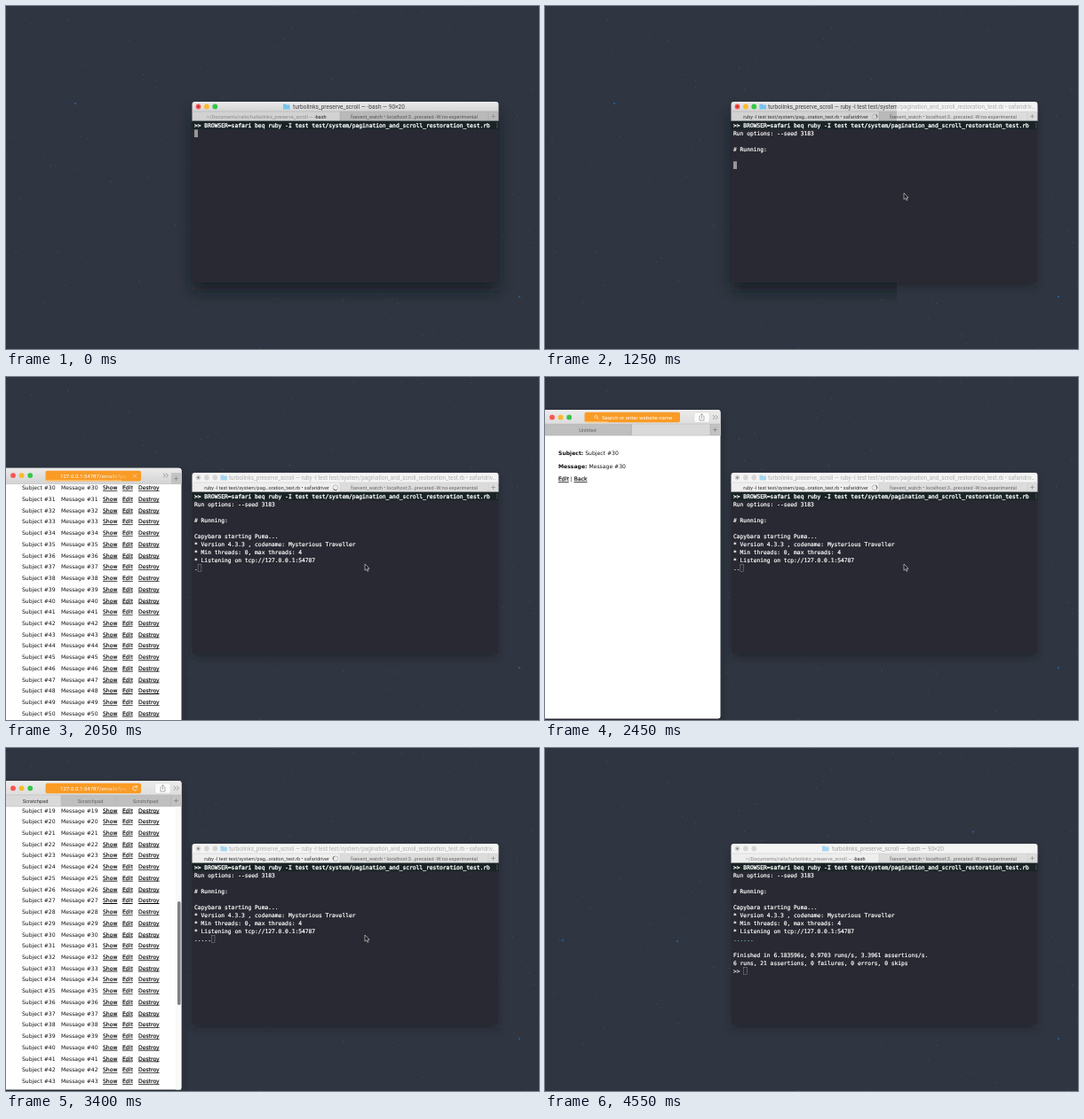
These frames come from a looping animation (600x387 px, 4.6 s). An HTML page:

```html
<!DOCTYPE html>
<html lang="en">
<head>
<meta charset="utf-8">
<title>Browser test run</title>
<style>
html, body { margin: 0; width: 100%; height: 100%; overflow: hidden; background: #303641; }
svg { display: block; width: 100vw; height: 100vh; }
text { white-space: pre; }
.ui { font-family: Roboto, Inter, sans-serif; }
.web { font-family: "DejaVu Sans", sans-serif; font-size: 6.1px; fill: #111; }
.mono { font-family: "DejaVu Sans Mono", monospace; font-size: 6.29px; fill: #fff; stroke: #fff; stroke-width: .2px; }
.command { stroke-width: .3px; }
.pass { fill: #66cbd0; stroke: #66cbd0; }
.link { text-decoration: underline; fill: #000; stroke: #000; stroke-width: .13px; }
.bold { font-weight: bold; }
</style>
</head>
<body>
<svg viewBox="0 0 600 387" preserveAspectRatio="none">
  <defs>
    <linearGradient id="bar" x1="0" y1="0" x2="0" y2="1">
      <stop offset="0" stop-color="#ebebeb"/><stop offset="1" stop-color="#d3d3d3"/>
    </linearGradient>
    <linearGradient id="fade" gradientUnits="userSpaceOnUse" x1="60" x2="135" y1="0" y2="0">
      <stop offset=".6" stop-color="#fff"/><stop offset="1" stop-color="#fff" stop-opacity=".25"/>
    </linearGradient>
    <filter id="blur" x="-20%" y="-20%" width="140%" height="150%"><feGaussianBlur stdDeviation="8"/></filter>
    <filter id="soft" x="-20%" y="-20%" width="140%" height="150%"><feGaussianBlur stdDeviation="5"/></filter>
    <clipPath id="left"><rect width="396" height="387"/></clipPath>
    <clipPath id="right"><rect x="396" width="204" height="387"/></clipPath>
    <clipPath id="page"><rect id="pageBox" width="197.5" height="387"/></clipPath>
  </defs>
  <g id="sky"></g>
  <g id="scene"></g>
</svg>
<script>
const LOOP = 4600, STEP = 50, ROW = 12.73, LINE = 8.97;
const $ = id => document.getElementById(id);

const rect = (x, y, w, h, fill, more = '') =>
  `<rect x="${x}" y="${y}" width="${w}" height="${h}" fill="${fill}" ${more}/>`;
const circle = (x, y, r, fill, more = '') =>
  `<circle cx="${x}" cy="${y}" r="${r}" fill="${fill}" ${more}/>`;
const path = (d, stroke, width = .6, fill = 'none') =>
  `<path d="${d}" stroke="${stroke}" stroke-width="${width}" fill="${fill}"/>`;
const text = (x, y, str, cls, more = '') =>
  `<text x="${x}" y="${y}" class="${cls}" ${more}>${str}</text>`;
const ui = (x, y, str, size, fill, anchor = 'start') =>
  text(x, y, str, 'ui', `font-size="${size}" fill="${fill}" text-anchor="${anchor}"`);
const lights = (x, y, gap, colors) =>
  colors.map((c, i) => circle(x + i * gap, y, 2.9, c)).join('');

const COLORED = ['#f9564f', '#fbb92e', '#35c647'];
const GREY = ['#d6d6d6', '#d6d6d6', '#d6d6d6'];

const COMMAND = '>> BROWSER=safari beq ruby -I test test/system/pagination_and_scroll_restoration_test.rb';
const SERVER = ['Capybara starting Puma...', '* Version 4.3.3 , codename: Mysterious Traveller',
  '* Min threads: 0, max threads: 4', '* Listening on tcp://127.0.0.1:54787'];
const RESULT = ['', 'Finished in 6.183596s, 0.9703 runs/s, 3.3961 assertions/s.',
  '6 runs, 21 assertions, 0 failures, 0 errors, 0 skips', '>> '];
const DOT_TIMES = [1950, 2250, 2700, 2800, 3300, 3900];

// Browser steps: start time, page, first visible row
const TOP = -3.5;
const STEPS = [
  [1350, 'blank'], [1450, 'list', TOP], [1550, 'list', 14], [1650, 'list', 30],
  [1750, 'show'], [1850, 'list', 30], [1950, 'list', TOP], [2050, 'list', 30], [2150, 'show'],
  [2250, 'list', 30], [2350, 'show'], [2500, 'list', TOP], [2600, 'list', 30],
  [2650, 'show'], [2700, 'list', 30], [2800, 'list', TOP], [3050, 'list', 19],
  [3150, 'show'], [3250, 'list', 19], [3300, 'list', TOP], [3350, 'list', 19],
  [3550, 'show'], [3700, 'list', 19], [3950, 'closed']
];

function stars() {
  let seed = 11;
  const rnd = () => (seed = seed * 16807 % 2147483647) / 2147483647;
  let out = '';
  for (let i = 0; i < 150; i++) {
    const x = rnd() * 600, y = rnd() * 387;
    out += circle(x.toFixed(1), y.toFixed(1), .5, '#8794a3', `opacity="${(.1 + rnd() * .35).toFixed(2)}"`);
  }
  return out;
}

const blueStars = t => (t < 3950 ? [[78, 110], [578, 328]] : [[482, 94.5], [20, 217], [149, 218], [578, 328]])
  .map(([x, y]) => circle(x, y, .9, '#1b78d0', 'opacity=".8"')).join('');

function termLines(t) {
  const lines = [COMMAND];
  if (t >= 700) lines.push('Run options: --seed 3183', '', '# Running:', '');
  if (t >= 1400) lines.push(...SERVER);
  lines.push('.'.repeat(DOT_TIMES.filter(d => t >= d).length));
  if (t >= 4150) lines.push(...RESULT);
  return lines;
}

function terminal(t, active) {
  const busy = t >= 300 && t < 4250;
  const ink = active ? '#444' : '#b2b2b2';
  let s = active
    ? rect(210, 119, 344, 202, '#11131a', 'opacity=".72" filter="url(#blur)"')
    : rect(211, 114, 342, 202, '#14171e', 'opacity=".5" filter="url(#soft)"');
  s += rect(209.5, 108, 345, 204, '#292933', 'rx="2.5"');
  s += path('M209.5 119.5V111q0-3 3-3H551.5q3 0 3 3V119.5Z', 'none', 0, active ? 'url(#bar)' : '#f4f4f4');
  s += rect(209.5, 119, 166.5, 11, active ? '#d2d2d2' : '#eeeeee');
  s += rect(376, 119, 178.5, 11, active ? '#b9b9b9' : '#dcdcdc');
  s += path('M209.5 119H554.5M376 119V130M543 119V130', active ? '#a5a5a5' : '#c8c8c8', .5);
  s += lights(216.5, 113.5, 9.4, active ? COLORED : GREY);
  s += circle(216.5, 113.5, 1, active ? '#8e1d18' : '#666');

  const folderX = busy ? 241.5 : 312;
  s += `<g opacity="${active ? 1 : .6}">` + rect(folderX, 110.8, 3.5, 2, '#62b9e8', 'rx=".6"')
    + rect(folderX, 111.5, 7.5, 5, '#74c5ef', 'rx=".6"') + '</g>';
  s += busy
    ? ui(251, 115.8, 'turbolinks_preserve_scroll — ruby -I test test/system/pagination_and_scroll_restoration_test.rb • safaridriv…', 6.35, ink)
    : ui(386, 115.8, 'turbolinks_preserve_scroll — -bash — 90×20', 6.5, active ? ink : '#a4a4a4', 'middle');
  s += busy
    ? ui(293.5, 126.6, 'ruby -I test test/system/pag…oration_test.rb • safaridriver', 5.55, '#333', 'middle')
    : ui(293, 126.6, '~/Documents/rails/turbolinks_preserve_scroll — <tspan fill="#222">-bash</tspan>', 5.6, '#8a8a8a', 'middle');
  s += ui(459.5, 126.6, 'fsevent_watch • localhost:3…precated -W:no-experimental', 5.6, active ? '#555' : '#686868', 'middle');
  s += path('M546 124.5H551M548.5 122V127', '#888', .6);
  if (busy) {
    s += circle(371, 124.8, 2.8, 'none', 'stroke="#bbb" stroke-width=".9"');
    s += `<g transform="rotate(${t * .6} 371 124.8)">` + path('M371 122a2.8 2.8 0 0 1 2.8 2.8', '#666', .9) + '</g>';
  }

  s += rect(209.5, 129.6, 345, 9.6, '#1a2426');
  const lines = termLines(t);
  lines.forEach((line, i) => {
    const passed = t >= 4150 && /^\.+$/.test(line);
    s += text(212, 137.1 + i * LINE, line, 'mono' + (i ? '' : ' command') + (passed ? ' pass' : ''));
  });
  s += path('M552 132h1v5h-1', '#777', .5);

  const row = lines.length - 1, cx = 212 + lines[row].length * 3.787, cy = 130.5 + row * LINE;
  s += active
    ? rect(cx, cy, 4, 8.6, '#969698')
    : rect(cx + .3, cy + .3, 3.8, 8.2, 'none', 'stroke="#8c8c90" stroke-width=".5"');
  return s;
}

function listPage(top, first) {
  const rowY = i => top + 4.3 + (i - first) * ROW;
  const count = first < 0 ? 20 : 60;
  const y0 = rowY(0);
  let s = '';
  if (first < 0) {
    s += text(15, y0 - 24.4, 'Emails', 'web bold', 'style="font-size:12.2px"');
    s += text(24, y0 - 9, 'Subject', 'web bold') + text(67.5, y0 - 9, 'Message', 'web bold');
    s += rect(15, y0 + 261, 33, 8.6, '#fff', 'rx="1.5" stroke="#c9c9c9" stroke-width=".5"');
    s += ui(31.5, y0 + 267.2, 'Load More', 5.4, '#111', 'middle');
  }
  for (let i = Math.max(0, Math.floor(first)); i < count && rowY(i) < 392; i++) {
    const y = rowY(i) + 2.2;
    s += text(18, y, 'Subject #' + i, 'web') + text(62, y, 'Message #' + i, 'web');
    s += text(109, y, 'Show', 'web link') + text(131, y, 'Edit', 'web link') + text(149, y, 'Destroy', 'web link');
  }
  return s;
}

function showPage(top) {
  const field = (y, name) => text(15, y, `<tspan class="bold">${name}:</tspan> ${name} #30`, 'web');
  return field(top + 22.2, 'Subject') + field(top + 37, 'Message')
    + text(15, top + 51.4, '<tspan class="link">Edit</tspan> | <tspan class="link">Back</tspan>', 'web');
}

function tabBar(y, tabs, active) {
  const pair = tabs.length === 2, w = pair ? 98 : 62;
  let s = rect(0, y, 197.5, 13, '#c3c2c3');
  tabs.forEach((name, i) => {
    const x = i * w, width = Math.min(w, 186 - x);
    s += rect(x, y, width, 13, i === active ? '#dad9da' : '#c0bfc0');
    s += path(`M${x + width} ${y}v13`, '#a9a9a9', .5);
    s += ui(x + width / 2 + (pair ? -1 : 2), y + 8.6, name, 5.7, i === active ? '#333' : '#666', 'middle');
  });
  s += path(`M0 ${y}h197.5M0 ${y + 13}h197.5`, '#b0b0b0', .5);
  return s + path(`M189 ${y + 6.5}h5M191.5 ${y + 4}v5`, '#777', .6);
}

function addressBar(y, t, page) {
  const blankTab = t >= 2400 && t < 2500 || page === 'blank';
  let s = rect(44.5, y + 2.7, 107.5, 11.6, '#f99b25', 'rx="2"');
  if (blankTab) {
    s += circle(57.5, y + 8, 1.6, 'none', 'stroke="#fff" stroke-width=".6"');
    s += path(`M58.7 ${y + 9.2}l1.7 1.7`, '#fff', .6);
    s += ui(64, y + 10.6, 'Search or enter website name', 6, '#fff');
    s += rect(45, y + 13.3, 26, 1, '#ffd08b');
    return s;
  }
  s += ui(61, y + 10.7, '127.0.0.1:54787/emails?pa', 6.1, 'url(#fade)');
  const loading = t < 3350;
  s += loading
    ? path(`M143 ${y + 6.5}l4 4m0-4l-4 4`, '#ffe6c4', .6)
    : path(`M147 ${y + 7}a2.4 2.4 0 1 0 .4 2.4M147.6 ${y + 5}v2.3h-2.3`, '#fff', .7);
  if (loading) s += rect(45, y + 13.3, 85, 1, '#ffd08b');
  return s;
}

function browser(t) {
  const step = STEPS.filter(e => t >= e[0]).pop();
  if (!step || step[1] === 'closed') return '';
  const [, page, first] = step;
  const early = t < 2250, y = early ? 102.7 : 37, bottom = early ? 395 : 385.5;
  const top = early ? 120.7 : 66;
  $('pageBox').setAttribute('y', top);
  $('pageBox').setAttribute('height', bottom - top);

  let s = rect(-10, y + 5, 207, bottom - y, '#12151b', 'opacity=".55" filter="url(#soft)"');
  s += rect(-10, y, 207.5, bottom - y, '#fff', 'rx="3"');
  s += path(`M0 ${y}H194.5q3 0 3 3V${top}H0Z`, 'none', 0, 'url(#bar)');
  s += lights(8, y + 8.4, 9.6, COLORED);
  s += addressBar(y + (early ? .4 : 0), t, page);
  const arrows = early ? 177 : 189;
  s += path(`M${arrows} ${y + 6}l2.2 2.4l-2.2 2.4m3.2-4.8l2.2 2.4l-2.2 2.4`, '#666', .6);
  if (early) {
    s += rect(186, y + 5.5, 11.5, 12.5, '#c4c3c4') + path(`M189 ${y + 12}h5M191.5 ${y + 9.5}v5`, '#777', .6);
    s += path(`M0 ${top}H197.5`, '#b8b8b8', .5);
  } else {
    s += rect(168, y + 3, 17, 11, '#fbfbfb', 'rx="1.5" stroke="#d0d0d0" stroke-width=".4"');
    s += path(`M175 ${y + 7}h-1v5h5v-5h-1M176.5 ${y + 10}v-5.3m-1.4 1.4l1.4-1.4l1.4 1.4`, '#666', .5);
    const tabs = t < 2500 ? ['Untitled', ''] : Array(t < 3300 ? 2 : 3).fill('Scratchpad');
    s += tabBar(53, tabs, t < 2500 ? 1 : 0);
  }

  s += '<g clip-path="url(#page)">';
  if (page === 'list') s += listPage(top, first);
  if (page === 'show') s += showPage(top);
  if (page === 'list' && first === 19 && t >= 3350) {
    s += rect(191, top, 6.5, 320, '#fafafa') + rect(193, 173, 3.6, 117, '#808080', 'rx="1.8"');
  }
  return s + '</g>';
}

const pointer = () => path('M404 211v7.2l1.7-1.5l1.2 2.6l1.2-.6l-1.2-2.5h2.2Z', '#e8e8e8', .6, '#16171c');

function draw(t) {
  let s = blueStars(t);
  if (t === 1250) {
    s += `<g clip-path="url(#left)">${terminal(t, true)}</g><g clip-path="url(#right)">${terminal(t, false)}</g>`;
  } else {
    s += terminal(t, t < 1250);
  }
  s += browser(t);
  if (t >= 1150 && t < 3950) s += pointer();
  $('scene').innerHTML = s;
}

$('sky').innerHTML = stars();
const start = performance.now();
let shown = -1;
function tick() {
  const t = Math.floor((performance.now() - start) % LOOP / STEP) * STEP;
  if (t !== shown) draw(shown = t);
  requestAnimationFrame(tick);
}
tick();
</script>
</body>
</html>
```
